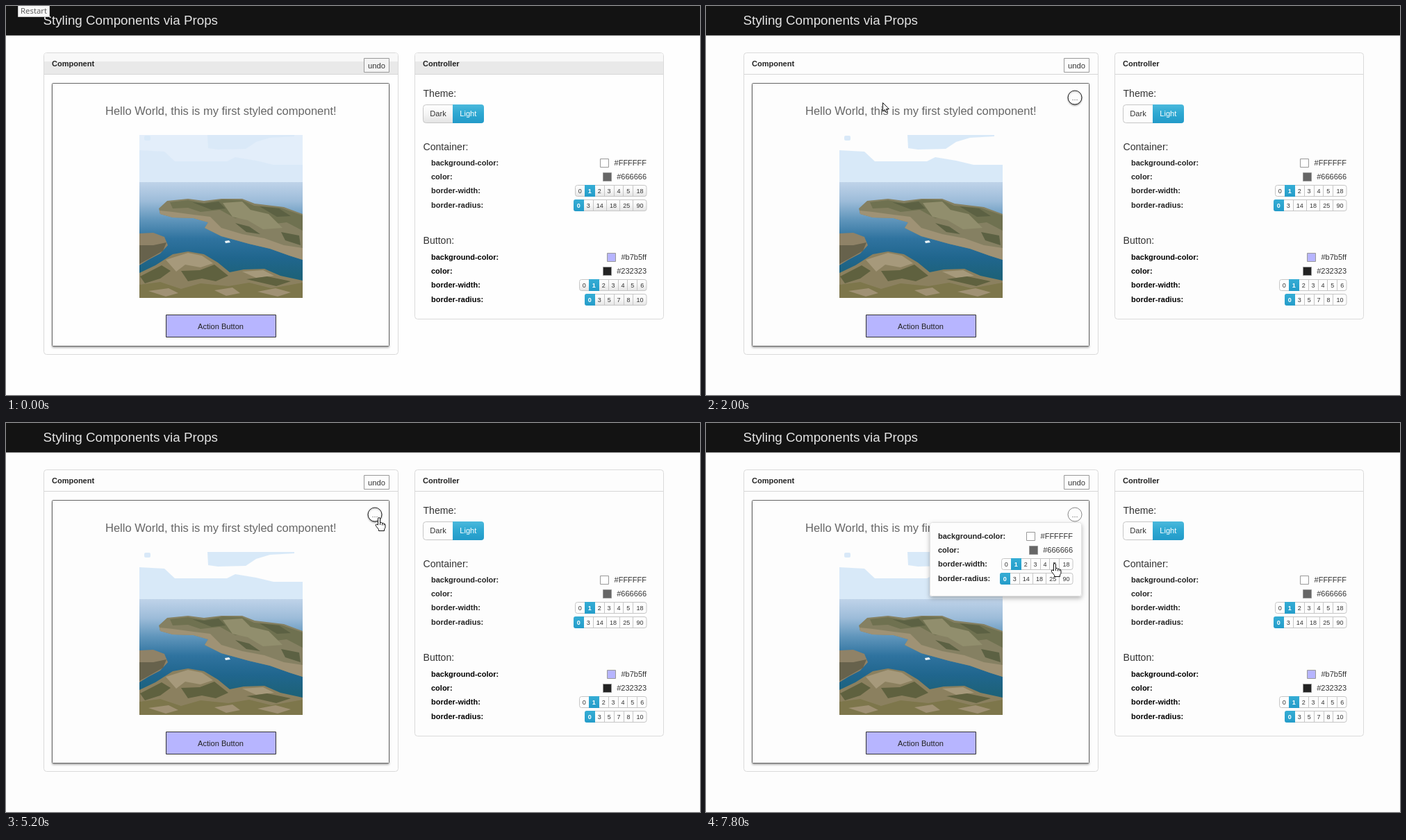
An HTML page with a canvas for the animation above (8000 ms loop, 999 by 561 pixels).

```html
<!DOCTYPE html>
<html>
<head>
<meta charset="utf-8">
<title>Styling Components via Props</title>
<style>
  html, body { margin: 0; width: 100%; height: 100%; overflow: hidden; background: #fefefe; }
  canvas { display: block; }
</style>
</head>
<body>
<canvas id="stage" width="999" height="561"></canvas>
<script>
const g = document.getElementById('stage').getContext('2d');
const LOOP = 8000, STEP = 100, FRESH = 1400, POPOVER = 5900;
const SANS = '"Liberation Sans", Arial, sans-serif';

// Pointer tip: [time, x, y]; a lone time hides it until the next entry.
const path = [
  [0], [1200, 36, 8], [1300, 37, 9], [1500, 70, 29], [1800, 205, 110], [2000, 254, 139],
  [2500, 455, 231], [2600, 455, 231], [3200, 600, 269], [3500, 657, 280], [3700, 657, 280],
  [3800], [4000, 660, 277], [4300, 637, 226], [4400], [4600, 631, 217], [5200, 537, 137],
  [5400, 530, 127], [6700, 530, 127], [7300, 508, 175], [7400], [7600, 504, 183],
  [7800, 502, 203], [8000, 502, 203]
];

const arrow = new Path2D('M.5 .5V13L3.4 10.3L5.3 14.6L7.4 13.7L5.5 9.6H9.4Z');
const hand = new Path2D('M-1.5 10V1Q-1.5 -.5 0 -.5T1.5 1V6.5Q4 5.5 4.5 7.5Q6.5 6.5 7 8.5Q9 8 9 10V13Q9 15 7.5 16V18.5H-.5V16.5L-4.5 11.5Q-5.5 9 -3.5 9Z');
const fingers = new Path2D('M1.5 6.5V10M4.5 7.5V10.5M7 8.5V10.5');

// Landscape shapes, in stage coordinates.
const clouds = new Path2D('M192 186H290L291 205L305 207L345 206L360 196L380 190L415 188V186H427V229H385L360 223L330 218L318 224H243L228 210L192 208Z');
const land = [
  ['#858062', 'M220 292L232 281L262 278L285 281L310 278L340 278L358 285L400 290L427 300V366L408 360L380 350L350 343L310 332L286 320L291 312L270 306L240 305L222 300Z'],
  ['#6f7150', 'M236 283L262 280L285 284L312 279L340 280L357 288L395 291L427 302V324L404 312L380 315L356 302L330 306L308 294L280 297L262 291L240 292Z'],
  ['#9f9275', 'M221 295L240 297L270 301L294 304L310 320L340 329L372 335L400 345L427 349V366L408 360L380 350L350 343L310 332L286 320L291 312L270 306L240 305L222 300Z'],
  ['#918e6d', 'M312 284L340 282L352 294L378 300L398 320L370 322L348 309L326 304Z'],
  ['#5c6143', 'M268 283L285 285L306 282L316 292L296 294ZM365 289L393 292L410 303L390 304ZM330 313L350 318L366 329L346 326ZM396 326L422 331L424 345L402 338Z'],
  ['#8f8267', 'M192 328L212 327L228 333L233 345L222 357L205 366L192 374Z'],
  ['#67624c', 'M192 345L212 345L231 341L226 353L205 365L192 372Z'],
  ['#8b805f', 'M192 385L215 374L240 358L262 354L285 358L305 370L322 384L342 380L372 379L395 389L427 396V421H192Z'],
  ['#a6997b', 'M230 366L262 356L282 360L298 371L280 377L258 373L245 383ZM340 383L370 381L386 389L360 392Z'],
  ['#5f613f', 'M193 390L224 374L237 382L222 393L200 400ZM252 382L279 381L300 373L320 389L302 397L282 393L262 397ZM346 394L376 390L410 397L389 404Z'],
  ['#7d764b', 'M192 402L222 398L252 408L280 400L320 404L350 399L382 407L427 399V421H192Z'],
  ['#a09174', 'M205 411L234 407L248 414L230 419ZM300 410L326 406L337 414L317 418ZM362 412L388 407L410 413L391 419Z'],
  ['#eef5f7', 'M315 339L321 338L323 341L316 342Z']
].map(([fill, d]) => [fill, new Path2D(d)]);

function box(x, y, w, h, r, fill, stroke) {
  g.beginPath();
  g.roundRect(x, y, w, h, r);
  if (fill) { g.fillStyle = fill; g.fill(); }
  if (stroke) { g.strokeStyle = stroke; g.lineWidth = 1; g.stroke(); }
}

function text(s, x, y, size = 11, color = '#222', { bold = false, align = 'left', font = SANS } = {}) {
  g.font = `${bold ? 'bold ' : ''}${size}px ${font}`;
  g.textAlign = align;
  g.fillStyle = color;
  g.fillText(s, x, y);
}

function shade(y0, y1, ...colors) {
  const fill = g.createLinearGradient(0, y0, 0, y1);
  colors.forEach((c, i) => fill.addColorStop(i / (colors.length - 1), c));
  return fill;
}

function withShadow(color, blur, dy, draw) {
  g.save();
  g.shadowColor = color;
  g.shadowBlur = blur;
  g.shadowOffsetY = dy;
  draw();
  g.restore();
}

function panel(title, x, w, h, plain, early) {
  box(x + .5, 67.5, w, h, 4, plain, '#dadada');
  if (early) {
    box(x + 1, 68, w - 1, 12, [3, 3, 0, 0], '#f8f8f8');
    box(x + 1, 80, w - 1, 18, 0, '#e9e9e9');
  }
  box(x + 1, 98, w - 1, 1, 0, '#d6d6d6');
  text(title, x + 12, 87, 11, '#222', { bold: true });
}

function choices(values, active, right, y, face) {
  const widths = values.map(v => v > 9 ? 19.2 : 13.9);
  const total = widths.reduce((a, b) => a + b);
  let x = Math.round(right - total);
  box(x + .5, y + .5, right - x - .5, 16, 3, face(y, y + 17), '#c6c6c6');
  values.forEach((v, i) => {
    const w = widths[i], on = i === active, left = Math.round(x);
    if (on) box(left, y, 15, 17, i ? 0 : [3, 0, 0, 3], shade(y, y + 17, '#35add5', '#249cc9'));
    else if (i && i - 1 !== active) box(left, y + 1, 1, 15, 0, '#c6c6c6');
    text(v, x + w / 2 + .4, y + 11.5, 9, on ? '#fff' : '#333', { bold: on, align: 'center' });
    x += w;
  });
}

function settings(left, right, y, ink, colors, widths, radii, face) {
  ['background-color:', 'color:', 'border-width:', 'border-radius:'].forEach((s, i) =>
    text(s, left, y + [0, 20, 39.5, 60.5][i], 11, ink, { bold: true }));
  colors.forEach((c, i) => {
    const base = y + i * 20;
    text(c, right, base, 11, '#333', { align: 'right' });
    const x = Math.round(right - g.measureText(c).width - 20.5);
    box(x + .5, Math.round(base) - 9.5, 12, 12, 0, c, '#999');
  });
  choices(widths, 1, right, y + 28, face);
  choices(radii, 0, right, y + 49, face);
}

function containerSettings(left, right, y, face) {
  settings(left, right, y, '#222', ['#FFFFFF', '#666666'],
    [0, 1, 2, 3, 4, 5, 18], [0, 3, 14, 18, 25, 90], face);
}

function photo(early) {
  g.save();
  g.beginPath();
  g.rect(192, 186, 235, 235);
  g.clip();
  box(192, 186, 235, 70, 0, early ? '#dae9f8' : '#d8e9f8');
  g.fillStyle = early ? '#e3eefa' : '#fdfdfd';
  g.fill(clouds);
  box(199, 187, 9, 7, 2, '#d9e9f8');
  box(192, 254, 235, 167, 0, shade(254, 390, '#bfd3e9', '#9dbcd9', '#5f95bb', '#2f739f', '#20668e', '#1d627a'));
  for (const [fill, shape] of land) {
    g.fillStyle = fill;
    g.fill(shape);
  }
  g.restore();
}

function menuDot(open) {
  const draw = () => box(521, 122, 20, 20, 10, '#fdfdfd', open ? '#888' : '#222');
  open ? draw() : withShadow('rgba(0,0,0,.3)', 2, 1.5, draw);
  text('...', 531, 136, 11, '#666', { align: 'center' });
}

function popover(face) {
  withShadow('rgba(0,0,0,.28)', 6, 3, () => box(322, 143, 219, 107, 3, '#fdfdfd'));
  box(322.5, 143.5, 218, 106, 3, null, '#e2e2e2');
  containerSettings(334, 528, 167, face);
}

function pointerAt(t) {
  const i = path.findIndex((p, n) => n + 1 === path.length || path[n + 1][0] > t);
  const [t0, x0, y0] = path[i], [t1, x1, y1] = path[i + 1] || path[i];
  if (x0 === undefined) return null;
  if (x1 === undefined) return { x: x0, y: y0 };
  const k = (t - t0) / (t1 - t0);
  return { x: Math.round(x0 + (x1 - x0) * k), y: Math.round(y0 + (y1 - y0) * k) };
}

function drawPointer({ x, y }, open) {
  const onDot = Math.hypot(x - 531, y - 132) < 11;
  const onChoice = open && x > 426 && x < 528 && y > 195 && y < 213;
  const isHand = onDot || onChoice;
  g.save();
  g.translate(x, y);
  g.fillStyle = '#fff';
  g.strokeStyle = '#111';
  g.lineWidth = 1;
  g.fill(isHand ? hand : arrow);
  g.stroke(isHand ? hand : arrow);
  if (isHand) g.stroke(fingers);
  g.restore();
}

function draw(time) {
  const t = Math.floor(time % LOOP / STEP) * STEP;
  const early = t < FRESH, open = t >= POPOVER;
  const plain = early ? '#fefefe' : '#fdfdfd';
  const face = (y0, y1) => early ? shade(y0, y1, '#fff', '#f6f6f6', '#e4e4e4') : plain;
  const pointer = pointerAt(t);

  box(0, 0, 999, 561, 0, plain);
  box(0, 0, 999, 42.5, 0, '#131313');
  text('Styling Components via Props', 53.4, 27, 18.8, '#e4e4e4');
  if (early) {
    box(17.5, -.5, 45, 16, 0, '#f8f8f8', '#c4c4c4');
    text('Restart', 40, 11, 11.4, '#555', { align: 'center', font: '"Open Sans", sans-serif' });
  }

  panel('Component', 54, 510, 435, plain, early);
  box(515.5, 75.5, 36, 20, 0, early ? '#f4f4f4' : plain, '#999');
  text('undo', 533.5, 89.5, 11.2, '#333', { align: 'center' });

  withShadow('rgba(0,0,0,.4)', 3, 2, () => box(66.5, 111.5, 485, 379, 1, plain));
  box(66.5, 111.5, 485, 379, 1, plain, '#666');
  text('Hello World, this is my first styled component!', 309.3, 157, 16.5, '#666', { align: 'center' });
  photo(early);
  box(230.5, 445.5, 158, 32, 0, '#b7b5ff', '#333');
  text('Action Button', 309, 465.5, 11.1, '#232323', { align: 'center' });

  panel('Controller', 588, 358, 384, plain, early);
  text('Theme:', 600.5, 131, 14.1, '#333');
  box(600.5, 142.5, 86, 26, 4, face(142, 168), '#c6c6c6');
  box(643, 142, 45, 27, [0, 4, 4, 0], shade(142, 168, '#4bb9dc', '#2ea8d2', '#239bc9'));
  text('Dark', 622, 159, 11.1, '#333', { align: 'center' });
  text('Light', 665.3, 159, 11.1, '#fff', { align: 'center' });
  text('Container:', 600.5, 207.5, 14.1, '#333');
  containerSettings(612, 922, 230, face);
  text('Button:', 600.5, 343, 14.1, '#333');
  settings(612, 922, 366, '#000', ['#b7b5ff', '#232323'],
    [0, 1, 2, 3, 4, 5, 6], [0, 3, 5, 7, 8, 10], face);

  const inside = pointer && pointer.x > 67 && pointer.x < 552 && pointer.y > 111 && pointer.y < 491;
  if (inside || open) menuDot(open);
  if (open) {
    g.globalAlpha = t < POPOVER + STEP ? .5 : 1;
    popover(face);
    g.globalAlpha = 1;
  }
  if (pointer) drawPointer(pointer, open);
}

const start = performance.now();
(function tick() {
  draw(performance.now() - start);
  requestAnimationFrame(tick);
})();
</script>
</body>
</html>
```
